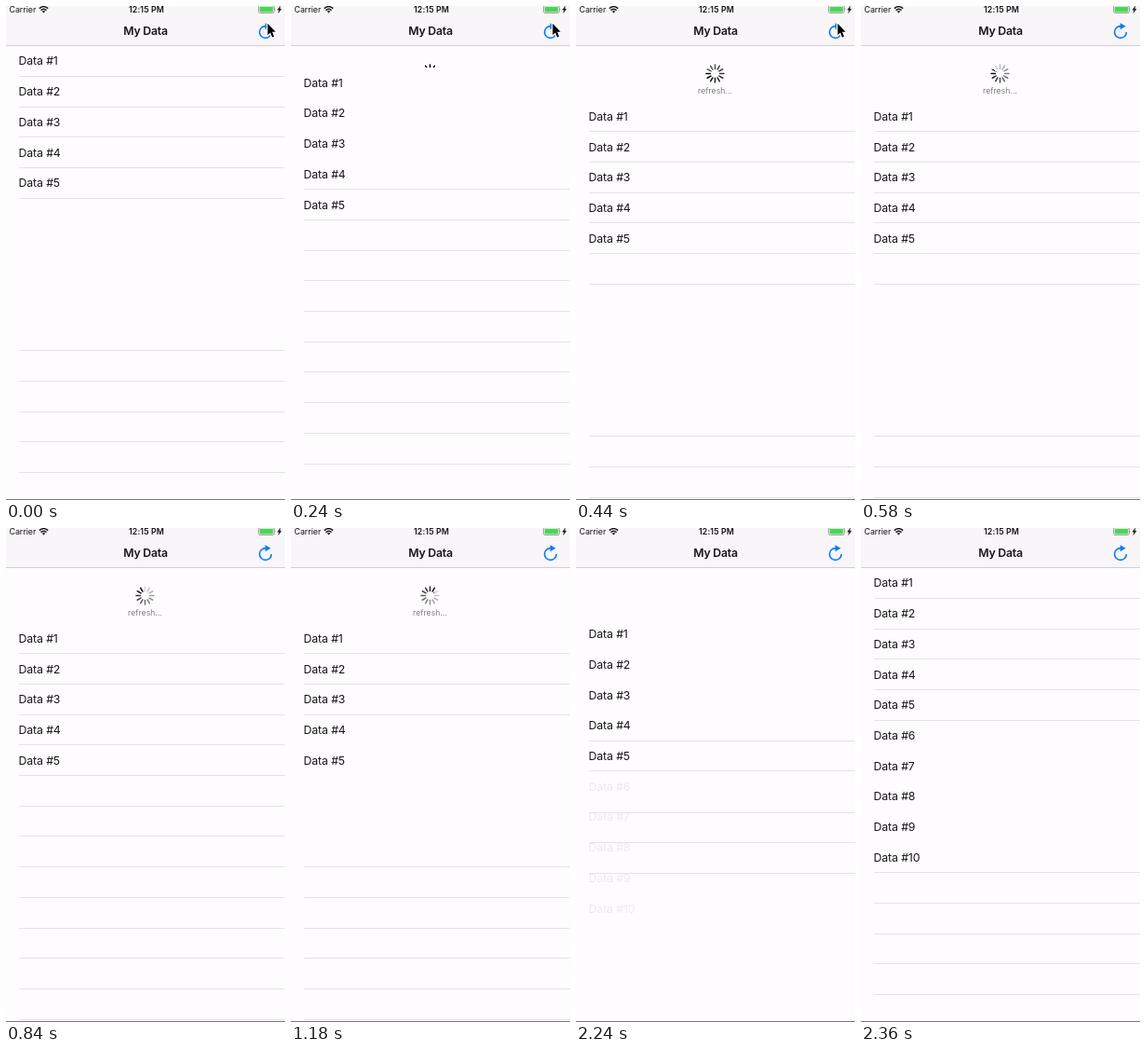
An HTML page that plays this animation: 300 by 530 pixels, repeating every 2580 ms.

```html
<!DOCTYPE html>
<html lang="en">
<head>
<meta charset="utf-8">
<title>My Data</title>
<style>
  @property --head { syntax: "<angle>"; inherits: false; initial-value: 266deg; }
  @property --tail { syntax: "<number>"; inherits: false; initial-value: 1; }

  html, body { margin: 0; width: 100%; height: 100%; overflow: hidden; }
  body { background: #fefcff; }
  #stage {
    --loop: 2580ms;
    position: relative; width: 300px; height: 530px; overflow: hidden;
    background: #fefcff; color: #151416;
    font: 12.3px Inter, "Liberation Sans", sans-serif;
  }
  #stage > *, .row, .line { position: absolute; }

  #bar {
    left: 0; top: 0; width: 300px; height: 42px;
    background: #f8f6f9; border-bottom: 1px solid #cfcdd1;
  }
  #bar > * { position: absolute; white-space: nowrap; }
  #bar svg { left: 0; top: 0; }
  .carrier { left: 3.5px; top: -2px; font-size: 8.8px; line-height: 12px; }
  .clock, .title { left: 0; width: 300px; text-align: center; font-weight: 600; }
  .clock { top: -2px; font-size: 8.8px; line-height: 12px; letter-spacing: .1px; left: 1px; }
  .title { top: 17px; line-height: 20px; letter-spacing: -.25px; }

  #list {
    left: 0; top: 42.7px; width: 300px; height: 560px; background: #fefcff;
    animation: pull var(--loop) infinite;
  }
  .row { left: 13.6px; height: 32.7px; line-height: 32.7px; letter-spacing: -.13px; white-space: nowrap; }
  .new { animation: arrive var(--loop) infinite; }
  .line, #stage > .rest { left: 14px; width: 286px; height: 1px; background: #e4e2e8; }
  .rest { animation: rest var(--loop) step-end infinite; }

  #spinner, #label { animation: leave var(--loop) infinite; }
  #spinner { left: 138px; top: 61px; width: 23px; height: 23px; }
  #spinner svg {
    display: block;
    -webkit-mask-image: conic-gradient(from var(--head), rgb(0 0 0 / var(--tail)), #000);
    mask-image: conic-gradient(from var(--head), rgb(0 0 0 / var(--tail)), #000);
    animation: spin var(--loop) linear infinite;
  }
  #label {
    left: 0; top: 85px; width: 299px; text-align: center;
    font-size: 8.7px; line-height: 12px; color: #808080;
  }
  #cursor { left: 0; top: 0; animation: pointer var(--loop) step-end infinite; }
  #edge { left: 0; top: 529px; width: 300px; height: 1px; background: #777; }

  @keyframes pull {
    0%, 5.116% { top: 42.7px; animation-timing-function: ease-in-out; }
    14.806%, 85.736% { top: 102.1px; animation-timing-function: ease-in-out; }
    91.473%, 100% { top: 42.7px; }
  }
  @keyframes arrive {
    0%, 85.736% { opacity: 0; animation-timing-function: ease-in-out; }
    91.473%, 100% { opacity: 1; }
  }
  @keyframes spin {
    0%, 15.504% { --head: 266deg; --tail: 1; }
    19% { --tail: .12; }
    86.434%, 100% { --head: 613deg; --tail: .12; }
  }
  @keyframes leave {
    0%, 79.845% { opacity: 1; transform: none; animation-timing-function: ease-in; }
    86.434%, 100% { opacity: 0; transform: scale(.3); }
  }
  @keyframes pointer { 0% { opacity: 1; } 17.829%, 100% { opacity: 0; } }
  @keyframes rest { 0% { opacity: 0; } 85.736% { opacity: 1; } 90.698%, 100% { opacity: 0; } }
</style>
</head>
<body>
<div id="stage">
  <div id="spinner"><svg width="23" height="23" viewBox="-11.5 -11.5 23 23"><g id="spokes" stroke="#000" stroke-width="1.5" stroke-linecap="round"></g></svg></div>
  <div id="label">refresh...</div>
  <div id="list"></div>
  <div class="rest" style="top:305px"></div>
  <div class="rest" style="top:337px"></div>
  <div class="rest" style="top:370px"></div>
  <div id="bar">
    <span class="carrier">Carrier</span>
    <span class="clock">12:15 PM</span>
    <span class="title">My Data</span>
    <svg width="300" height="42">
      <g fill="none" stroke="#111" stroke-width="1.4">
        <path d="M35.8 2.6Q40.5-1.4 45.2 2.6M37.5 4.6Q40.5 2 43.5 4.6"/>
        <path d="M38.8 5.7Q40.5 4.5 42.2 5.7L40.5 7.6z" fill="#111" stroke="none"/>
      </g>
      <rect x="271.5" y="-.5" width="17" height="8" rx="1.8" fill="none" stroke="#8d8d8d" stroke-width=".8"/>
      <rect x="272.7" y=".7" width="14.6" height="5.7" rx=".8" fill="#4cd557"/>
      <path d="M289.3 2.2q1.2 1.3 0 2.7z" fill="#8d8d8d"/>
      <path d="M295 0L291.8 4.2H293.7L292.8 7.6L296.2 3.2H294.3z" fill="#111" stroke="#111" stroke-width=".3"/>
      <path d="M285.4 28A6.4 6.4 0 1 1 279 21.6" fill="none" stroke="#0a7bf5" stroke-width="1.6"/>
      <path d="M278.7 18.3L284.7 21.8L278.7 25.3z" fill="#0a7bf5"/>
    </svg>
  </div>
  <svg id="cursor" width="300" height="44">
    <path d="M281.4 18.8V31.2L284.2 28.6L286.2 33.6L288.2 32.7L286.2 27.8H289.8z"
      fill="#000" stroke="#fff" stroke-width="2.4" stroke-linejoin="round" paint-order="stroke"/>
  </svg>
  <div id="edge"></div>
</div>
<script>
  const LOOP = 2580, PITCH = 32.7;
  const list = document.getElementById("list");

  function add(className, top, text = "") {
    const el = document.createElement("div");
    el.className = className;
    el.style.top = top + "px";
    el.textContent = text;
    list.append(el);
    return el;
  }

  for (let i = 0; i < 10; i++) add(i < 5 ? "row" : "row new", 0.8 + i * PITCH, "Data #" + (i + 1));

  // Separators shown from each moment on, as inclusive row ranges
  const phases = [
    [0, [0, 4], [9, 13]],
    [132, [3, 12]],
    [440, [0, 5], [10, 12]],
    [600, [0, 12]],
    [940, [0, 2], [7, 12]],
    [2212, [3, 4]],
    [2340, [0, 4], [9, 13]],
    [LOOP, [0, 4], [9, 13]]
  ];
  let css = "";
  for (let i = 0; i < 14; i++) {
    const steps = phases.map(([ms, ...ranges]) => {
      const on = ranges.some(([a, b]) => i >= a && i <= b);
      return `${(ms / LOOP * 100).toFixed(3)}% { opacity: ${+on}; }`;
    });
    css += `@keyframes line${i} { ${steps.join(" ")} }\n`;
    add("line", 32.2 + i * PITCH).style.animation = `line${i} ${LOOP}ms step-end infinite`;
  }
  const sheet = document.createElement("style");
  sheet.textContent = css;
  document.head.append(sheet);

  let spokes = "";
  for (let a = 0; a < 360; a += 30) spokes += `<path d="M0-5.1V-9.5" transform="rotate(${a})"/>`;
  document.getElementById("spokes").innerHTML = spokes;
</script>
</body>
</html>
```
